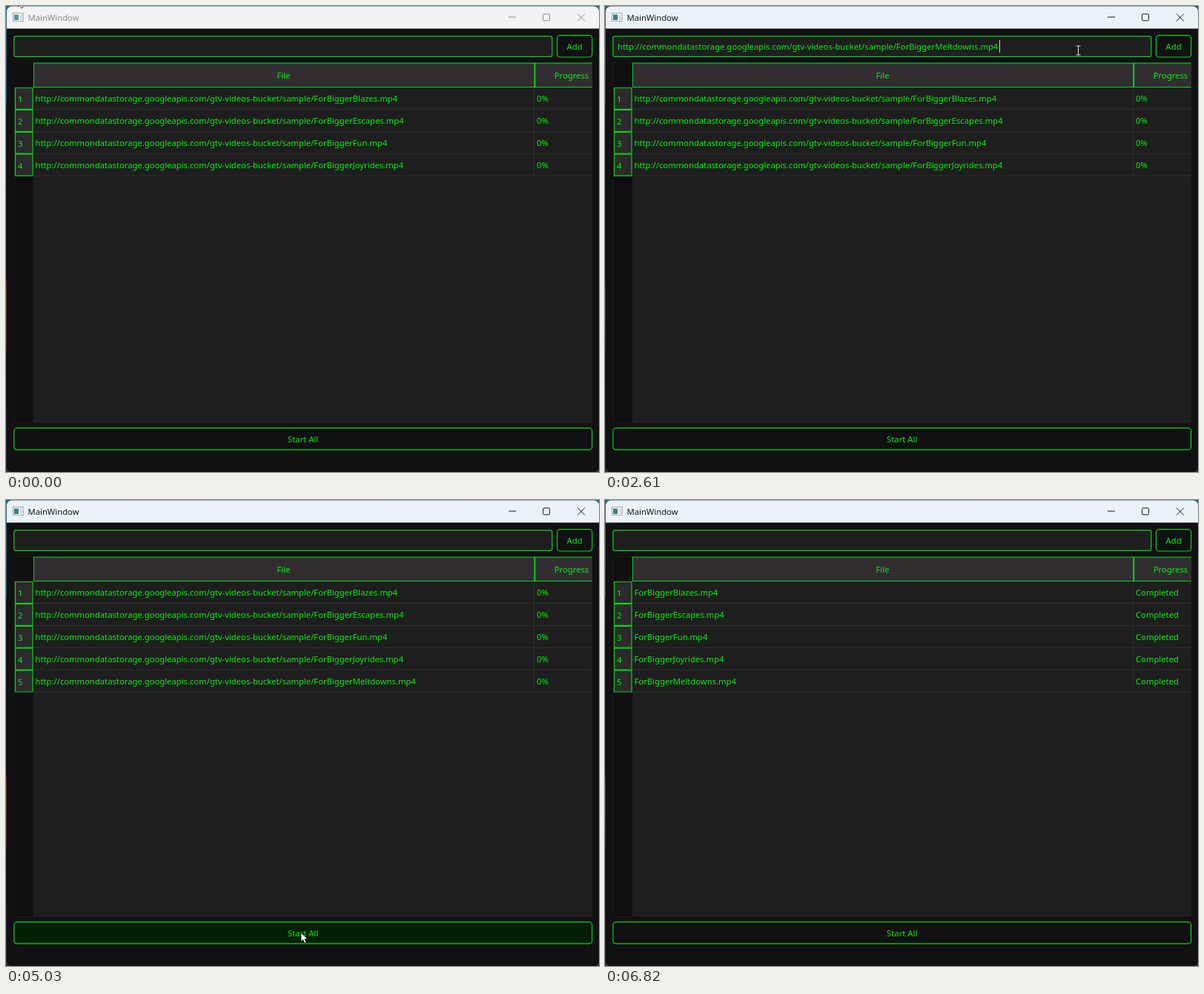
Animation of 800 by 629 pixels, one loop 7 s. Source, as an HTML page with a canvas:

```html
<!DOCTYPE html>
<html lang="en">
<head>
<meta charset="utf-8">
<title>Download manager</title>
<style>
  html, body { margin: 0; width: 100%; height: 100%; overflow: hidden; background: #111012; }
  canvas { display: block; }
</style>
</head>
<body>
<canvas id="stage" width="800" height="629"></canvas>
<script>
const ctx = document.getElementById('stage').getContext('2d');
const LOOP = 7000;
const GREEN = '#08d21c', TEXT = '#06f00c';
const DARK = '#111012', PANEL = '#1e1e1f', HEADER = '#322d31', GRID = '#2d2d2f';
const BASE_URL = 'http://commondatastorage.googleapis.com/gtv-videos-bucket/sample/';
const ROW_HEIGHT = 29.9;

const ACTIVATE = 1500, PASTE = 2470, ADD = 3800, START = 5300;

// ease is the exponent of the progress curve
const files = [
  { name: 'ForBiggerBlazes.mp4',    done: 6560, ease: 1.96 },
  { name: 'ForBiggerEscapes.mp4',   done: 6600, ease: 1.82 },
  { name: 'ForBiggerFun.mp4',       done: 6760, ease: 3.1 },
  { name: 'ForBiggerJoyrides.mp4',  done: 6640, ease: 1.8 },
  { name: 'ForBiggerMeltdowns.mp4', done: 6710, ease: 1.75 },
];

// time, x, y of the pointer's hot spot
const pointerPath = [
  [0, 16, -11], [30, 16, -11], [120, 8, -30], [1000, 600, -20],
  [1400, 638, 60], [3060, 638, 60], [3450, 769, 53], [3850, 769, 53],
  [4440, 428, 531], [4520, 428, 531], [4850, 398, 584], [5070, 398, 584],
  [5200, 402, 640],
];

const between = (t, from, to) => t >= from && t < to;

function rect(x, y, w, h, fill) {
  ctx.fillStyle = fill;
  ctx.fillRect(x, y, w, h);
}

function box(x, y, w, h, radius, fill, stroke) {
  ctx.beginPath();
  ctx.roundRect(x, y, w, h, radius);
  if (fill) { ctx.fillStyle = fill; ctx.fill(); }
  if (stroke) { ctx.strokeStyle = stroke; ctx.lineWidth = 1.2; ctx.stroke(); }
}

function text(str, x, y, color = TEXT, align = 'left') {
  ctx.font = '11.25px "Noto Sans", "Open Sans", sans-serif';
  ctx.textAlign = align;
  ctx.fillStyle = color;
  ctx.fillText(str, x, y);
}

function pointerAt(t) {
  const i = pointerPath.findIndex(p => p[0] > t);
  if (i < 0) return pointerPath[pointerPath.length - 1].slice(1);
  const [t0, x0, y0] = pointerPath[i - 1], [t1, x1, y1] = pointerPath[i];
  const u = (t - t0) / (t1 - t0), k = u * u * (3 - 2 * u);
  return [x0 + (x1 - x0) * k, y0 + (y1 - y0) * k];
}

function drawDesktop() {
  const g = ctx.createLinearGradient(0, 0, 0, 629);
  [[0, '#2d6475'], [.2, '#27586c'], [.22, '#14202a'], [.58, '#15171c'],
   [.61, '#6b3a22'], [.73, '#4a2a20'], [.76, '#16161b'], [1, '#25333d']]
    .forEach(([stop, color]) => g.addColorStop(stop, color));
  rect(0, 0, 800, 629, g);
}

function drawTitleBar(active) {
  const ink = active ? '#141414' : '#8c8c8c';
  box(1, .5, 799, 40, [7, 7, 0, 0], active ? '#ebf3f8' : '#f3f3f3');
  box(9.5, 9.5, 13.5, 11, 0, '#fafafa', '#a3a9ad');
  rect(11, 11.5, 6, 7.5, active ? '#3a7f88' : '#5a9499');
  rect(18.5, 11.5, 3, 7.5, '#d3d9dc');
  text('MainWindow', 29.5, 20, ink);
  ctx.strokeStyle = ink;
  ctx.lineWidth = 1;
  ctx.beginPath();
  ctx.moveTo(678, 15); ctx.lineTo(688, 15);
  ctx.moveTo(771, 10.5); ctx.lineTo(781, 20.5);
  ctx.moveTo(781, 10.5); ctx.lineTo(771, 20.5);
  ctx.roundRect(724.5, 10.8, 9, 9, 1.5);
  ctx.stroke();
}

function drawButton(label, x, y, w, h, fill) {
  box(x, y, w, h, 4, fill, GREEN);
  text(label, x + w / 2, y + h / 2 + 4.5, TEXT, 'center');
}

function drawInput(t) {
  box(10.8, 40.8, 726, 27.5, 2.5, PANEL, GREEN);
  const url = between(t, PASTE, ADD) ? BASE_URL + files[4].name : '';
  text(url, 17, 59);
  if (between(t, ACTIVATE, 2250)) rect(17, 46, 1, 17, '#d8d8d8');
  if (between(t, PASTE, 2700)) rect(532, 46, 1, 17, '#d8d8d8');
}

function drawRow(file, i, t) {
  const y = 110 + ROW_HEIGHT * i, done = t >= file.done;
  box(12.5, y + .5, 23.5, ROW_HEIGHT - 1, 0, '#2d2a2d', GREEN);
  text(i + 1, 16, y + 20);
  rect(37, y + 29, 754, 1, GRID);
  rect(712, y, 1, ROW_HEIGHT, GRID);
  text(done ? file.name : BASE_URL + file.name, 39.5, y + 19);
  const u = Math.max(0, (t - START) / (file.done - START));
  text(done ? 'Completed' : Math.floor(100 * u ** file.ease) + '%', 716, y + 19);
}

function drawTable(t) {
  rect(11, 76, 780, 487, '#1b1b1c');
  rect(12, 77, 25, 485, '#0f0e10');
  rect(37, 76, 754, 486, PANEL);
  rect(37, 77, 754, 33, HEADER);
  rect(37, 76.6, 754, 1, GREEN);
  rect(37, 109, 754, 1, GREEN);
  rect(37, 77, 1, 33, GREEN);
  rect(712.3, 77, 2, 33, GREEN);
  text('File', 374.5, 98, TEXT, 'center');
  text('Progress', 763, 98, TEXT, 'center');
  files.slice(0, t < ADD ? 4 : 5).forEach((file, i) => drawRow(file, i, t));
}

function drawPointer(x, y) {
  ctx.save();
  ctx.translate(x, y);
  ctx.lineWidth = 1;
  ctx.beginPath();
  if (between(x, 11, 737) && between(y, 41, 68)) {
    ctx.strokeStyle = '#e4e4e4';
    ctx.moveTo(-2.5, -6); ctx.lineTo(3.5, -6);
    ctx.moveTo(.5, -6); ctx.lineTo(.5, 6);
    ctx.moveTo(-2.5, 6); ctx.lineTo(3.5, 6);
  } else {
    [[0, 0], [0, 12], [2.7, 9.5], [4.8, 14], [7, 13], [5, 8.7], [8.8, 8.7]]
      .forEach(p => ctx.lineTo(...p));
    ctx.closePath();
    ctx.fillStyle = '#fff';
    ctx.fill();
    ctx.strokeStyle = '#111';
    ctx.lineWidth = .7;
  }
  ctx.stroke();
  ctx.restore();
}

function draw() {
  const t = performance.now() % LOOP;
  const [x, y] = pointerAt(t);
  const overAdd = between(x, 743, 791) && between(y, 40, 70);
  const overStart = between(x, 11, 791) && between(y, 570, 599);

  drawDesktop();
  drawTitleBar(t >= ACTIVATE);
  box(1, 30.4, 799, 598.6, [0, 0, 7, 7], DARK);
  drawInput(t);
  drawButton('Add', 743.5, 39.7, 47.2, 29.3,
    overAdd ? (between(t, 3600, 3720) ? '#023402' : '#001e00') : DARK);
  drawTable(t);
  drawButton('Start All', 10.8, 569.7, 779.8, 29.2, overStart ? '#001e00' : DARK);
  drawPointer(x, y);
  requestAnimationFrame(draw);
}
draw();
</script>
</body>
</html>
```
